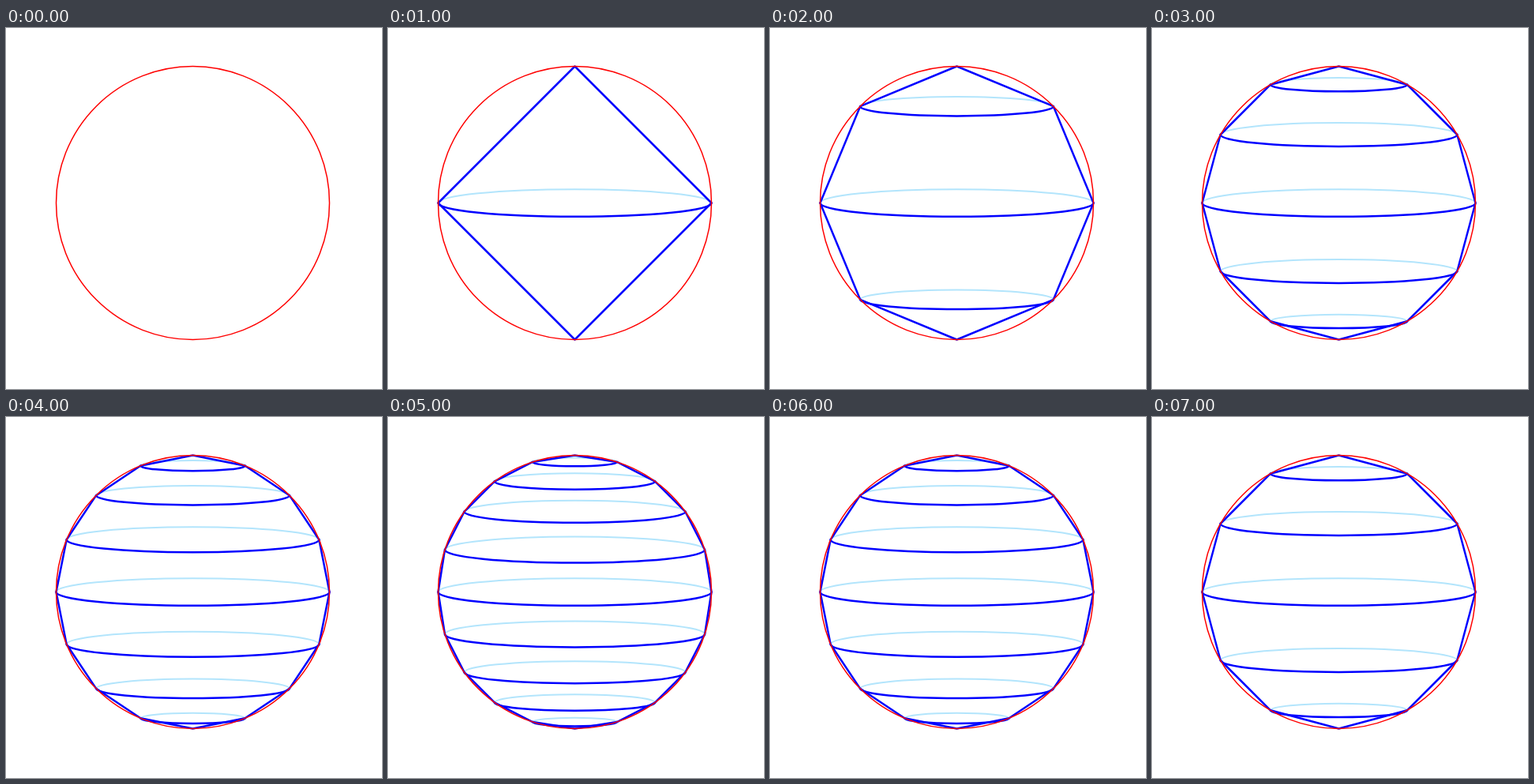
Animation of 476 by 457 pixels, one loop 8 s. Source, as an HTML page with a canvas:

```html
<!DOCTYPE html>
<html lang="en">
<head>
<meta charset="utf-8">
<title>Sphere approximated by cone slices</title>
<style>
  html, body { margin: 0; width: 100%; height: 100%; overflow: hidden; background: #fff; }
  canvas { display: block; }
</style>
</head>
<body>
<canvas id="stage" width="476" height="457"></canvas>
<script>
const ctx = document.getElementById('stage').getContext('2d');
const CX = 236.5, CY = 221.5, R = 173, TILT = 0.1;
const STEP_MS = 1000;
const SLICES = [0, 2, 4, 6, 8, 10, 8, 6];

function stroke(color, width, path) {
  ctx.beginPath();
  path();
  ctx.strokeStyle = color;
  ctx.lineWidth = width;
  ctx.stroke();
}

function eachRing(n, visit) {
  for (let i = 1; i < n; i++) {
    const a = Math.PI * i / n;
    visit(CY - R * Math.cos(a), R * Math.sin(a));
  }
}

function halfRing(y, r, from) {
  ctx.ellipse(CX, y, r, r * TILT, 0, from, from + Math.PI);
}

function draw(n) {
  ctx.fillStyle = '#fff';
  ctx.fillRect(0, 0, 476, 457);
  ctx.lineJoin = ctx.lineCap = 'round';

  if (n) {
    eachRing(n, (y, r) => stroke('#b3e5fc', 2, () => halfRing(y, r, Math.PI)));
    eachRing(n, (y, r) => stroke('#00f', 2.5, () => halfRing(y, r, 0)));
    stroke('#00f', 2.5, () => {
      for (let i = 0; i < 2 * n; i++) {
        const a = Math.PI * i / n;
        ctx.lineTo(CX + R * Math.sin(a), CY - R * Math.cos(a));
      }
      ctx.closePath();
    });
  }
  stroke('#f00', 1.5, () => ctx.arc(CX, CY, R, 0, 2 * Math.PI));
}

function frame() {
  draw(SLICES[Math.floor(performance.now() / STEP_MS) % SLICES.length]);
  requestAnimationFrame(frame);
}
frame();
</script>
</body>
</html>
```
